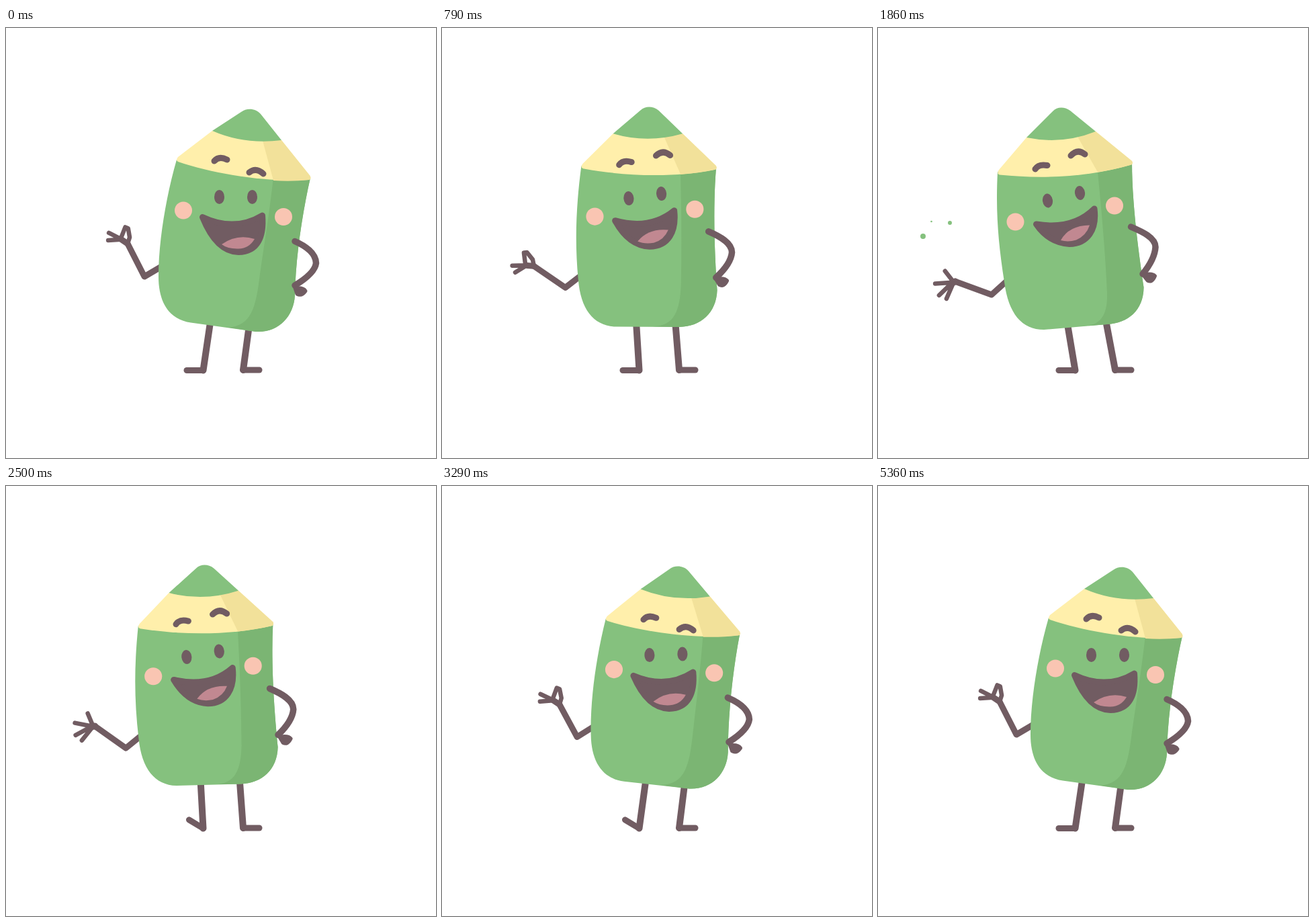
An HTML page for the animation above (5430 ms loop, 640 px wide and 640 px high).

```html
<!DOCTYPE html>
<html>
<head>
<meta charset="utf-8">
<style>
html, body { margin: 0; width: 100%; height: 100%; overflow: hidden; background: #fff }
svg { display: block; width: 100vw; height: 100vh }
path { stroke-linecap: round; stroke-linejoin: round }
</style>
</head>
<body>
<svg id="stage" viewBox="0 0 640 640"></svg>
<script>
const LOOP = 5430;
const GREEN = '#85c17e', SHADE = '#7bb573', CREAM = '#ffefab', TAN = '#f2e19a';
const BROWN = '#715c62', BLUSH = '#f9c5b2', TONGUE = '#c18891';
const stage = document.getElementById('stage');
const lerp = (a, b, k) => a + (b - a) * k;

function add(name, attrs, parent = stage) {
  const el = document.createElementNS('http://www.w3.org/2000/svg', name);
  for (const key in attrs) el.setAttribute(key, attrs[key]);
  return parent.appendChild(el);
}

// Blends two strings of the same structure, number by number.
function mix(a, b, k) {
  const ends = b.match(/-?[\d.]+/g);
  let i = 0;
  return a.replace(/-?[\d.]+/g, n => lerp(+n, +ends[i++], k).toFixed(2));
}

// Smooth curve through [time, value] keys.
function curve(keys, t) {
  let i = 0;
  while (i < keys.length - 2 && t >= keys[i + 1][0]) i++;
  const slope = j => j < 1 || j > keys.length - 2 ? 0
    : (keys[j + 1][1] - keys[j - 1][1]) / (keys[j + 1][0] - keys[j - 1][0]);
  const [t0, a] = keys[i], [t1, b] = keys[i + 1], d = t1 - t0;
  const s = (t - t0) / d, r = 1 - s;
  return a * r * r * (1 + 2 * s) + b * s * s * (3 - 2 * s)
    + d * s * r * (slope(i) * r - slope(i + 1) * s);
}

// Shapes are given leaning right and leaning left;
// "late" is how far a shape follows the swing instead of the lean.
const shapes = [];
let layer = stage;
function shape(fill, stroke, width, right, left, late = 0) {
  const el = add('path', { fill, stroke, 'stroke-width': width }, layer);
  shapes.push({ el, right, left, late });
  return el;
}
const solid = (color, right, left) => shape(color, 'none', 0, right, left);
const line = (width, right, left, color = BROWN, late = 0) =>
  shape('none', color, width, right, left, late);

// Legs and left foot
line(10, 'M304.5 435L293.5 509.5', 'M281 435L293.5 509.5', BROWN, 1);
line(10, 'M363 435L353 509', 'M339 435L353 509', BROWN, 1);
add('path', { d: 'M353 509H377', stroke: BROWN, 'stroke-width': 9 });
const foot = add('path', { d: 'M293.5 509.5H269', stroke: BROWN, 'stroke-width': 9 });

// Throwing arm and its hand, drawn along the forearm
const arm = add('path', { fill: 'none', stroke: BROWN, 'stroke-width': 9 });
const hand = add('g', { fill: 'none', stroke: BROWN, 'stroke-width': 6.5 });
const pinch = add('g', {}, hand), open = add('g', {}, hand);
add('path', { d: 'M0 0L11 -6L27 -17.6M10 -6L17.6 -23.5M12 -5L23.5 8L20 11L7 7L0 0' }, pinch);
add('path', { d: 'M0 0L9 -5', 'stroke-width': 9 }, pinch);
add('path', { d: 'M3 -1L19.6 9.4M4 -3L27 -13.2M4 -4L15.6 -27.5M2 -4L3.5 -28.5' }, open);
add('path', { d: 'M0 0L4 -4', 'stroke-width': 10 }, open);

// Body
const body = layer = add('g', {});
solid(GREEN,
  'M254 196C239 248 227 315 227 370C227 410 244 434 275 438.5L372 452C405 454 428 430 430 398C431 345 440 280 453 223Z',
  'M178 214C175 275 179 320 188 378C194 425 214 449 247 449L341 441C372 439 395 421 395.5 386C389 340 378 265 378 200Z');
solid(SHADE,
  'M398 222C392 275 385 318 378 366C372 415 366 444 330 445.5L372 452C405 454 428 430 430 398C431 345 440 280 453 223Z',
  'M326.5 209C333 275 338 330 341 394C342 425 333 444 303 444L341 441C372 439 395 421 395.5 386C389 340 378 265 378 200Z');
solid(CREAM,
  'M256 199Q252 197 256 192L307 153L410 167L452.5 220Q455 225 451 226C385 230 310 217 256 199Z',
  'M181 218.5Q176 217 180 211L221 163L324 154L378 198Q380 202 377 203.5C315 222 245 225 181 218.5Z');
solid(TAN,
  'M381 164L398 227C415 228 433 228 451 226Q455 225 452.5 220L410 167Z',
  'M296 160L327 214.5C345 212 361 208 377 203.5Q380 202 378 198L324 154Z');
solid(GREEN,
  'M307 153L350 125C358 119 371 119 379 128L410 167Q355 174 307 153Z',
  'M221 163L260 124C267 117 277 117 286 123L324 154Q274 174 221 163Z');

// Face
line(9, 'M310 198Q317 190 329 196', 'M234 210Q239 202 252 204.5');
const brow = line(9, 'M362 215Q372 207 383 217', 'M287 190Q297 179 308 188');
const eyes = [
  ['translate(317.5 251.5) rotate(0)', 'translate(252.5 257) rotate(-8)'],
  ['translate(366.5 251.5) rotate(0)', 'translate(300.5 245.5) rotate(-8)']
].map(([right, left]) => ({
  right, left, el: add('ellipse', { rx: 7.5, ry: 10.5, fill: BROWN }, body)
}));
line(26, 'M264 271.5h0', 'M204.5 288.5h0', BLUSH);
line(26, 'M413 281h0', 'M352 264.5h0', BLUSH);
shape(BROWN, BROWN, 9,
  'M292.5 281.5Q340 304 381.5 279C384 310 375 333 346 333.5C318 333 302 305 292.5 281.5Z',
  'M235.5 292Q290 301 322 269C326 300 312 321 285 321.5C262 320 247 309 235.5 292Z');
solid(TONGUE,
  'M321 322Q344 306 370 314Q362 328 346 328.5Q330 329 321 322Z',
  'M272 316Q284 294 315 293.5Q310 309 295 315.5Q283 319 272 316Z');

// Arm on the hip
line(9.5,
  'M430 317.5C445 324 461 335 461.5 350C460 362 445 374 430 383',
  'M376.5 296C393 303 413 312 413 326C412 342 403 355 394 366', BROWN, .4);
shape(BROWN, BROWN, 5,
  'M429 384L433 396Q440 400 446 391.5Q443 386 431 387Z',
  'M394 367L401 376Q408 380 412.5 369Q408 364.5 397 367Z', .8);

// Crumbs: resting place and the time each one vanishes
const crumbs = [[67, 310, 2180], [107, 290, 2100], [79.5, 288, 1970]].map(([x, y, end]) =>
  ({ x, y, end, el: add('circle', { fill: GREEN }) }));

const LEAN = [[0, 0], [300, .02], [570, .15], [790, .604], [1140, .94], [1400, .985], [1860, 1],
  [2290, .93], [2500, .747], [2860, .22], [3290, .132], [3430, .129], [4430, .066], [5360, 0], [LOOP, 0]];
const SWING = [[0, 0], [300, .02], [570, .13], [790, .665], [1140, .96], [1400, .99], [1860, 1],
  [2290, .85], [2500, .645], [2860, .13], [3290, .033], [4430, 0], [LOOP, 0]];

function tap(t, mid, half) {
  const d = Math.abs(t - mid) / half;
  return d < 1 ? 1 - d ** 4 * (2 - d ** 4) : 0;
}

function draw(t) {
  const u = curve(LEAN, t), v = curve(SWING, t);
  for (const s of shapes) s.el.setAttribute('d', mix(s.right, s.left, lerp(u, v, s.late)));
  for (const e of eyes) e.el.setAttribute('transform', mix(e.right, e.left, u));

  // Keeps the sway on an arc around the feet.
  const grow = 1 + .0216 * u * (1 - u);
  body.setAttribute('transform', `translate(323 510) scale(${grow}) translate(-323 -510)`);
  const raise = 26 * (v - u) + 45 * v * v * (1 - v);
  brow.setAttribute('transform', `translate(${8 * u * (1 - u)} ${-raise})`);

  const lift = tap(t, 2500, 390) + tap(t, 3290, 390) + tap(t, 4965, 385);
  foot.setAttribute('transform', `rotate(${31 * lift} 293.5 509.5)`);

  const ex = lerp(206, 169, u), ey = lerp(370, 397, u);
  const angle = 243 - 43 * v, rad = angle * Math.PI / 180, len = 55 + 2.5 * v;
  const wx = ex + len * Math.cos(rad), wy = ey + len * Math.sin(rad);
  arm.setAttribute('d', `M${lerp(240, 200, u)} ${lerp(350, 369, u)}L${ex} ${ey}L${wx} ${wy}`);
  hand.setAttribute('transform', `translate(${wx} ${wy}) rotate(${angle})`);
  const released = t > 950 && t < 2800;
  open.style.display = released ? '' : 'none';
  pinch.style.display = released ? 'none' : '';

  const p = Math.min(1, Math.max(0, (t - 970) / 880)), out = 1 - (1 - p) ** 5;
  for (const c of crumbs) {
    c.el.setAttribute('cx', lerp(94, c.x, out));
    c.el.setAttribute('cy', lerp(362, c.y, out));
    c.el.setAttribute('r', p ? Math.max(0, Math.min(5, (c.end - t) / 80)) : 0);
  }
}

const start = performance.now();
function tick() {
  draw((performance.now() - start) % LOOP);
  requestAnimationFrame(tick);
}
tick();
</script>
</body>
</html>
```
